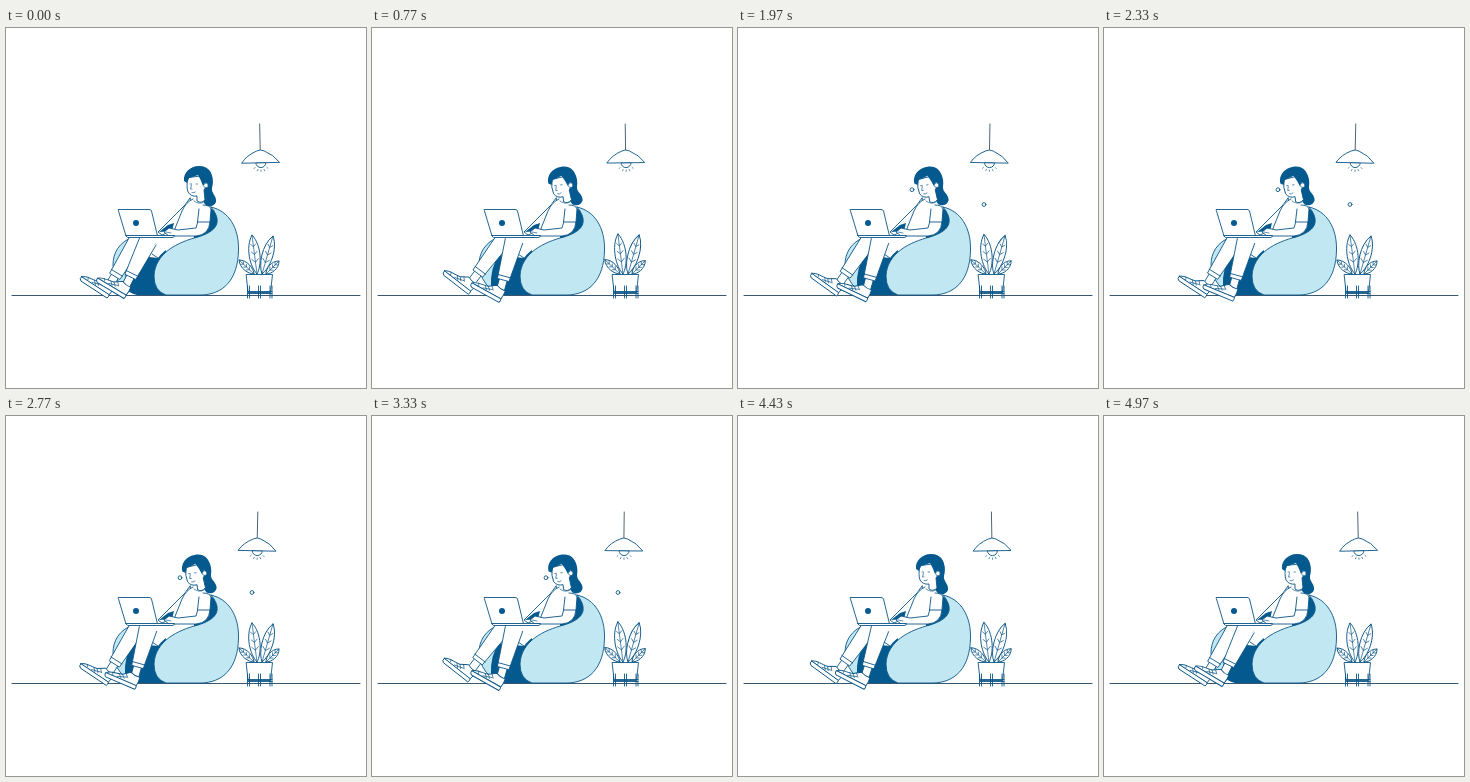
These frames come from a looping animation (360 px wide and 360 px high, 5 s). An HTML page:

```html
<!DOCTYPE html>
<html lang="en">
<head>
<meta charset="utf-8">
<title>Working from a bean bag</title>
<style>
  html, body { margin: 0; width: 100%; height: 100%; overflow: hidden; background: #fff; }
  svg { display: block; width: 100vw; height: 100vh; }
  .line { fill: none; stroke: #0c5687; stroke-width: .9; stroke-linecap: round; stroke-linejoin: round; }
  .white { fill: #fff; }
  .light { fill: #c1e7f3; }
  .dark { fill: #04598f; stroke: none; }
  .thin { stroke-width: .65; }
  .none { stroke: none; }
</style>
</head>
<body>
<svg viewBox="0 0 360 360">
  <defs>
    <g id="shoe" class="line white">
      <path d="M-33 -4C-29 -8 -23 -7 -17 -9L-10 -14Q-5 -12 0 -13Q1 -8 0 -4Z"/>
      <path d="M-33 -4H0Q1 -2 0 0H-31Q-34 -1 -33 -4Z"/>
      <path class="thin" d="M-27 -7Q-25 -5 -26 -4M-20 -8l3 3M-17 -9l3 3M-14 -11l3 3M-21 -5L-12 -8"/>
    </g>
  </defs>

  <path class="line" style="stroke:#23465f" d="M6 267.5H354"/>

  <g id="lamp" class="line">
    <path style="stroke:#3d5566" d="M252.7 96V122"/>
    <path class="white" d="M248 135a5 4.6 0 0 0 10 0Z"/>
    <path class="white" d="M234 134.5Q239 127 249 123Q252.7 121 256.500 123Q266 127 271.500 134.500Z"/>
    <path class="thin" d="M247 139.500l-1 1M250 141.500l-.6 1.300M253 142v1.400M256 141.500l.6 1.300M259 139.500l1 1"/>
  </g>

  <g id="plant" class="line white"></g>
  <g class="line white">
    <path d="M240.500 246.500H266.500L264.500 264.500H242.500Z"/>
    <path d="M241.500 258v12M243.500 258v12M252.500 258v12M254.500 258v12M264 258v12M266 258v12M241.500 263.500H266M241.500 265.500H266"/>
  </g>

  <path class="line light" d="M127 209C113 214 107 225 107 237Q108 252 119 261L132 225Z"/>
  <path class="dark" d="M119 259Q118 239 127 228L160 220V267H131Q122 265 119 259Z"/>
  <g id="backLeg"></g>
  <path class="white" d="M123 209H192C172 214 159 220 152 230L143 229L128 217Z"/>
  <path class="line" d="M146 226L152 230M145 220L149 216"/>
  <g id="frontLeg"></g>

  <path class="dark" d="M199 180Q207 178 211 187Q214 200 202 207L188 211V184Z"/>
  <path class="line light" d="M205 179C223 183 233 200 232.500 222C232 252 217 267 194 267H160Q148 263 148 248C149 225 172 214 192 209C208 204 214 197 210 187Q208 182 205 179Z"/>

  <g class="line white">
    <path d="M184 170L179 177L161 195L152 204L156 207L170 201L185 190Z"/>
    <path class="none" d="M187 171L181 175Q172 187 166 205H197Q203 191 203 179L197 174Z"/>
    <path d="M187 171Q180 174 176 183L168 203"/>
    <path class="dark" d="M153 204L162 197L168 195L166 203Z"/>
    <path d="M192 193L190 200L172 202L163 200L158 204L163 208L190 208Q203 207 204 194Z"/>
    <path d="M197 177Q204 177 205 181L204 194H191.500L193 181"/>
    <path class="thin" d="M160 204l5 1M188 173Q193 177 198 174"/>
  </g>

  <g id="head">
    <path class="dark" d="M195 140C205 140 209 150 206 160C205 165 211 168 210 174Q208 179 202 178Q196 176 198 168L196 152Z"/>
    <path class="line white" d="M182 150Q180 158 182 164Q185 169 191 168L191 173Q195 176 199 172L198 162L202 156L197 148Z"/>
    <path class="dark" d="M178 153C177 145 184 138 193 138C203 138 207 145 206 153Q205 157 202 159Q202 154 199 155L197 158Q195 152 192 147Q187 149 183 150L181 155Z"/>
    <circle class="line white thin" cx="200" cy="157.500" r="2.300"/>
    <path class="line thin" d="M184 156h1.500M190 156h1.500M185.500 157L184.500 161L186 161M186 164.500Q188 165.500 189.500 164"/>
  </g>

  <g class="line white">
    <path d="M112.500 181.500H143Q145 181.500 145.500 183L151.500 208H120L112.500 183Z"/>
    <path d="M120 207.500H168.500Q168.500 209.500 166 209.500H122Z"/>
    <circle class="dark" cx="130" cy="195" r="3"/>
  </g>

  <circle id="bubbleA" class="line white" cx="174" cy="161.700"/>
  <circle id="bubbleB" class="line white" cx="246" cy="176.500"/>
</svg>
<script>
  const LOOP = 5000;
  const el = id => document.getElementById(id);
  const mix = (a, b, k) => a + (b - a) * k;
  const ramp = (t, a, b) => {
    const k = Math.min(1, Math.max(0, (t - a) / (b - a)));
    return k * k * (3 - 2 * k);
  };
  const pulse = (t, a, b, c, d) => ramp(t, a, b) - ramp(t, c, d);

  // Leaf pointing from its base to its tip, with veins.
  function leaf(x, y, tipX, tipY, w) {
    const len = Math.hypot(tipX - x, tipY - y);
    const turn = Math.atan2(tipX - x, y - tipY) * 180 / Math.PI;
    let veins = `M0 0V${-len}`;
    for (const k of [.3, .5, .7]) {
      const s = w * .6 * (1.1 - k * .6), v = -len * k;
      veins += `M${-s} ${v - s}L0 ${v}L${s} ${v - s}`;
    }
    return `<g transform="translate(${x} ${y}) rotate(${turn})">
      <path d="M0 0C${-w} ${-len * .2} ${-w * 1.4} ${-len * .7} 0 ${-len}C${w * 1.4} ${-len * .7} ${w} ${-len * .2} 0 0Z"/>
      <path class="thin" d="${veins}"/></g>`;
  }
  el('plant').innerHTML = leaf(251, 246, 246, 207, 6) + leaf(256, 246, 267, 208, 6) +
    leaf(248, 246, 233, 232, 4) + leaf(260, 246, 273, 233, 4);

  function makeLeg(id, knee, kneeHalf) {
    const g = el(id);
    g.innerHTML = '<path class="line white"/><use href="#shoe"/><path class="line white"/>';
    const [sock, shoe, trouser] = g.children;
    return (heelX, heelY, angle) => {
      const a = angle * Math.PI / 180, c = Math.cos(a), s = Math.sin(a);
      const ax = heelX - 5 * c + 13 * s, ay = heelY - 5 * s - 13 * c;
      const dx = ax - knee[0], dy = ay - knee[1], len = Math.hypot(dx, dy);
      const nx = -dy / len, ny = dx / len;
      const at = (k, w) => `${knee[0] + dx * k + nx * w} ${knee[1] + dy * k + ny * w}`;
      sock.setAttribute('d', `M${at(.75, 4)}L${at(1.03, 4)}L${at(1.03, -4)}L${at(.75, -4)}`);
      shoe.setAttribute('transform', `translate(${heelX} ${heelY}) rotate(${angle})`);
      trouser.setAttribute('d', `M${at(0, kneeHalf)}L${at(.82, 6)}L${at(.82, -6)}L${at(0, -kneeHalf)}M${at(.74, 6.5)}L${at(.74, -6.5)}`);
    };
  }
  const backLeg = makeLeg('backLeg', [131, 212], 8);
  const frontLeg = makeLeg('frontLeg', [142, 213], 9);

  function bubble(id, size, r) {
    el(id).setAttribute('r', r * size);
    el(id).setAttribute('opacity', size > .02 ? 1 : 0);
  }

  function draw(t) {
    const turn = 2 * Math.PI * t / LOOP;
    const tap = (1 - Math.cos(2 * turn)) / 2;
    const step = pulse(t, 0, 700, 4250, 4930);
    const nod = pulse(t, 150, 700, 3200, 3850);

    backLeg(mix(101, 94, tap), mix(270, 264.5, tap), mix(33, 40, tap));
    frontLeg(mix(118, 129, step) - 3 * tap * step, mix(270.5, 273, step) + 2 * tap * step,
      mix(31, 22, step) + 10 * tap * step);
    el('head').setAttribute('transform', `rotate(${-7 * nod} 197 168)`);
    el('lamp').setAttribute('transform', `rotate(${-1.3 * Math.cos(turn)} 252.7 54)`);
    el('plant').setAttribute('transform', `translate(253.5 246) scale(${1 + .02 * tap} ${1 + .045 * tap}) translate(-253.5 -246)`);
    bubble('bubbleA', pulse(t, 1250, 1650, 3850, 4350), 1.9);
    bubble('bubbleB', pulse(t, 1300, 1750, 3300, 3750), 1.9);
  }

  function frame() {
    draw(performance.now() % LOOP);
    requestAnimationFrame(frame);
  }
  draw(0);
  requestAnimationFrame(frame);
</script>
</body>
</html>
```
